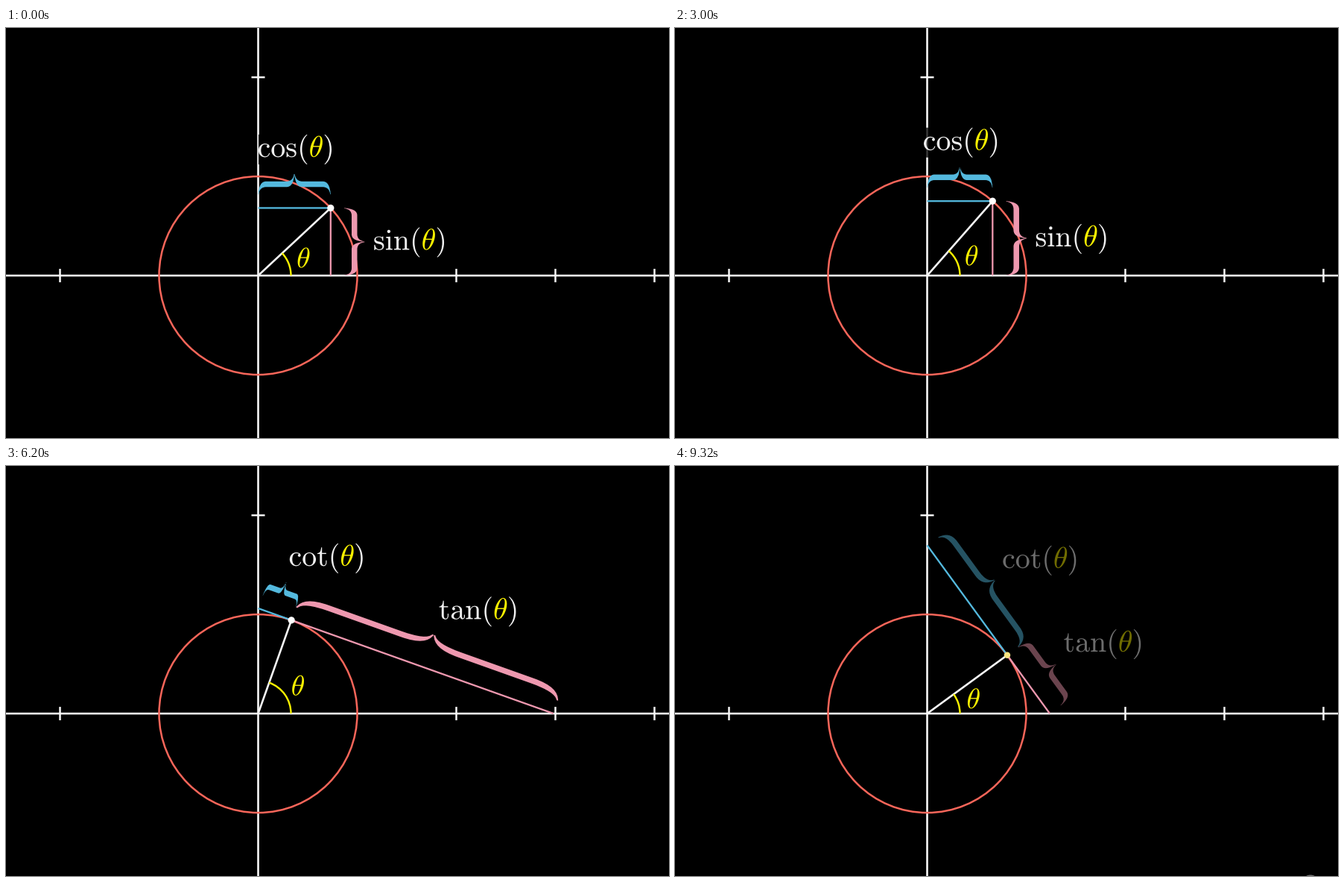
Recreate the animation shown at these times as a matplotlib script. Size 890 px wide and 550 px high, loop 9400 ms.

```python
import numpy as np
import matplotlib.pyplot as plt
from matplotlib.animation import FuncAnimation
from matplotlib.patches import Arc, Circle, Ellipse, PathPatch, Rectangle
from matplotlib.path import Path
from matplotlib.textpath import TextPath
from matplotlib.transforms import Affine2D

plt.rcParams["mathtext.fontset"] = "cm"
plt.rcParams["path.snap"] = False

W, H, DPI = 890, 550, 100
STEP, FRAMES = 40, 235
OX, OY = 338.5, 332.1            # origin in pixels from the top left
R = 133                          # unit length
EM = 40
BUFF, BRACE_H, TIP = 18.3, 26.3, 45.5
TIP_AT = 0.508                   # where the tip sits along the brace
LABEL_GAP = 13
CUT = 3.6                        # seconds: sin/cos gives way to tan/cot
FADE_START = 8.8

WHITE, RED, YELLOW = "#f8f8f8", "#f9665a", "#faf200"
TEXT = "#f0f0f0"
BLUE, PINK = "#54b9de", "#ee98af"

fig = plt.figure(figsize=(W / DPI, H / DPI), dpi=DPI, facecolor="black")
ax = fig.add_axes([0, 0, 1, 1])
ax.set_xlim(-OX, W - OX)
ax.set_ylim(OY - H, OY)
ax.axis("off")


def px(width):
    return width * 72 / DPI


def line(xs, ys, color, width=2.4, z=2):
    return ax.plot(xs, ys, color=color, lw=px(width), zorder=z,
                   solid_capstyle="butt")[0]


# ---- motion ----
def smooth(x):
    x = np.clip(x, 0, 1)
    low = 1 / (1 + np.exp(5))
    return (1 / (1 + np.exp(-10 * (x - 0.5))) - low) / (1 - 2 * low)


KEY_T = np.array([3.6, 4.2, 4.7, 5.2, 5.8, 6.2, 6.66, 7.12, 7.6, 8.0, 8.3, 8.5, 9.4])
KEY_A = np.array([39.4, 48.8, 59.4, 68.3, 71.5, 70.4, 64, 52.4, 40.7, 36.9, 36.1, 36.1, 36.1])
KEY_S = np.gradient(KEY_A, KEY_T)


def hermite(t):
    i = int(np.clip(np.searchsorted(KEY_T, t, side="right") - 1, 0, len(KEY_T) - 2))
    h = KEY_T[i + 1] - KEY_T[i]
    u = (t - KEY_T[i]) / h
    return ((1 + 2 * u) * (1 - u) ** 2 * KEY_A[i] + u * (1 - u) ** 2 * h * KEY_S[i]
            + u * u * (3 - 2 * u) * KEY_A[i + 1] + u * u * (u - 1) * h * KEY_S[i + 1])


def angle(t):
    if t < CUT:
        return 36 + 36 * smooth(1 - abs(t - 1.6) / 2.5)
    return hermite(t)


# ---- shapes ----
def brace_path():
    left = np.array([
        (0, 0), (.01, .42), (.04, .66), (.11, .66), (.385, .66),
        (.45, .66), (.485, .785), (.494, 1.035), (.5, 1.035),
        (.49, .615), (.46, .375), (.39, .375), (.115, .375),
        (.05, .375), (.015, .25), (.006, 0), (0, 0)])
    curve = [Path.CURVE4] * 3
    codes = ([Path.MOVETO] + curve + [Path.LINETO] + curve + [Path.LINETO]
             + curve + [Path.LINETO] + curve + [Path.CLOSEPOLY])
    right = left * (-1, 1) + (1, 0)
    return Path(np.concatenate([left, right]), codes * 2)


def glyphs(text, size=EM, x=0):
    p = TextPath((0, 0), f"${text}$", size=size)
    return Path(p.vertices + (x, 0), p.codes)


def join(a, b):
    return Path(np.concatenate([a.vertices, b.vertices]),
                np.concatenate([a.codes, b.codes]))


def shape(path, color, z):
    return ax.add_patch(PathPatch(path, fc=color, ec="none", lw=0, zorder=z))


class Label:
    """A function name with a yellow theta on a dim backing box."""

    def __init__(self, name, advance):
        x = advance * EM
        white = join(glyphs(r"\mathrm{%s}(" % name),
                     glyphs(")", x=x + 0.469 * EM))
        box = white.get_extents()
        self.x0, self.y0, self.w = box.x0, box.y0, box.width
        self.back = ax.add_patch(Rectangle((box.x0, box.y0), box.width, box.height,
                                           fc="black", ec="none", lw=0, zorder=6))
        self.word = shape(white, TEXT, 7)
        self.theta = shape(glyphs(r"\theta", x=x), YELLOW, 7)
        self.parts = (self.back, self.word, self.theta)

    def place(self, left, bottom, alpha):
        move = Affine2D().translate(left - self.x0, bottom - self.y0) + ax.transData
        for p in self.parts:
            p.set_transform(move)
            p.set_alpha(alpha)
        self.back.set_alpha(0.78 * alpha)

    def show(self, on):
        for p in self.parts:
            p.set_visible(on)


# ---- fixed parts ----
line([-OX, W - OX], [0, 0], WHITE, 2.6, 1)
line([0, 0], [OY - H, OY], WHITE, 2.6, 1)
for k in (-2, 2, 3, 4):
    line([k * R, k * R], [-9, 9], WHITE, 2.5, 1)
line([-9, 9], [2 * R, 2 * R], WHITE, 2.5, 1)
ax.add_patch(Circle((0, 0), R, fc="none", ec=RED, lw=px(2.5), zorder=2))

# ---- moving parts ----
blue_line = line([], [], BLUE, 2.3, 3)
pink_line = line([], [], PINK, 2.3, 3)
radius = line([], [], WHITE, 2.6, 4)
arc = ax.add_patch(Arc((0, 0), 88, 88, theta1=0, theta2=45, ec=YELLOW,
                       lw=px(2.4), zorder=4))
dot = ax.add_patch(Circle((0, 0), 4.6, ec="none", lw=0, zorder=8))
corner = ax.add_patch(Ellipse((853 - OX, OY - 552), 14, 7, fc="#707070",
                              ec="none", lw=0, zorder=3))

theta_path = glyphs(r"\theta", 38)
theta_box = theta_path.get_extents()
theta_mid = (theta_box.x0 + theta_box.width / 2, theta_box.y0 + theta_box.height / 2)
arc_label = shape(theta_path, YELLOW, 5)

BRACE = brace_path()
blue_brace = shape(BRACE, BLUE, 5)
pink_brace = shape(BRACE, PINK, 5)

labels = {
    "cos": Label("cos", 1.727), "sin": Label("sin", 1.617),
    "cot": Label("cot", 1.722), "tan": Label("tan", 1.834),
}


def measure(seg, brace, a, b, label, alpha):
    """Lay a segment from a to b with its brace and label on the left side."""
    a, b = np.array(a), np.array(b)
    seg.set_data([a[0], b[0]], [a[1], b[1]])
    d = b - a
    length = np.hypot(*d)
    n = np.array([-d[1], d[0]]) / length
    brace.set_transform(Affine2D().scale(length, BRACE_H).translate(0, BUFF)
                        .rotate(np.arctan2(d[1], d[0])).translate(*a) + ax.transData)
    brace.set_alpha(alpha)
    x, y = a + TIP_AT * d + n * (TIP + LABEL_GAP)
    if abs(n[0]) < 1e-6:
        x -= label.w / 2
    elif abs(n[1]) < 1e-6:
        y -= EM / 2
    label.place(x, y, alpha)


def draw(i):
    t = i * STEP / 1000
    deg = angle(t)
    th = np.radians(deg)
    c, s = np.cos(th), np.sin(th)
    p = (R * c, R * s)
    fade = float(smooth(t - FADE_START))

    first = t < CUT
    for name, label in labels.items():
        label.show((name in ("sin", "cos")) == first)
    if first:
        measure(blue_line, blue_brace, (0, p[1]), p, labels["cos"], 1)
        measure(pink_line, pink_brace, p, (p[0], 0), labels["sin"], 1)
    else:
        measure(blue_line, blue_brace, (0, R / s), p, labels["cot"], 1 - fade)
        measure(pink_line, pink_brace, p, (R / c, 0), labels["tan"], 1 - fade)

    radius.set_data([0, p[0]], [0, p[1]])
    arc.theta2 = deg
    arc.stale = True
    arc_label.set_transform(
        Affine2D().translate(65.6 * np.cos(th / 2) - theta_mid[0],
                             65.6 * np.sin(th / 2) - theta_mid[1]) + ax.transData)
    dot.center = p
    dot.set_radius(4.6 * (1 - 0.15 * fade))
    dot.set_facecolor((1 - 0.05 * fade, 1 - 0.2 * fade, 1 - 0.9 * fade))
    corner.set_visible(t > 9.2)
    return []


anim = FuncAnimation(fig, draw, frames=FRAMES, interval=STEP, repeat=True,
                     repeat_delay=0, init_func=lambda: draw(0), blit=False)
plt.show()
```
